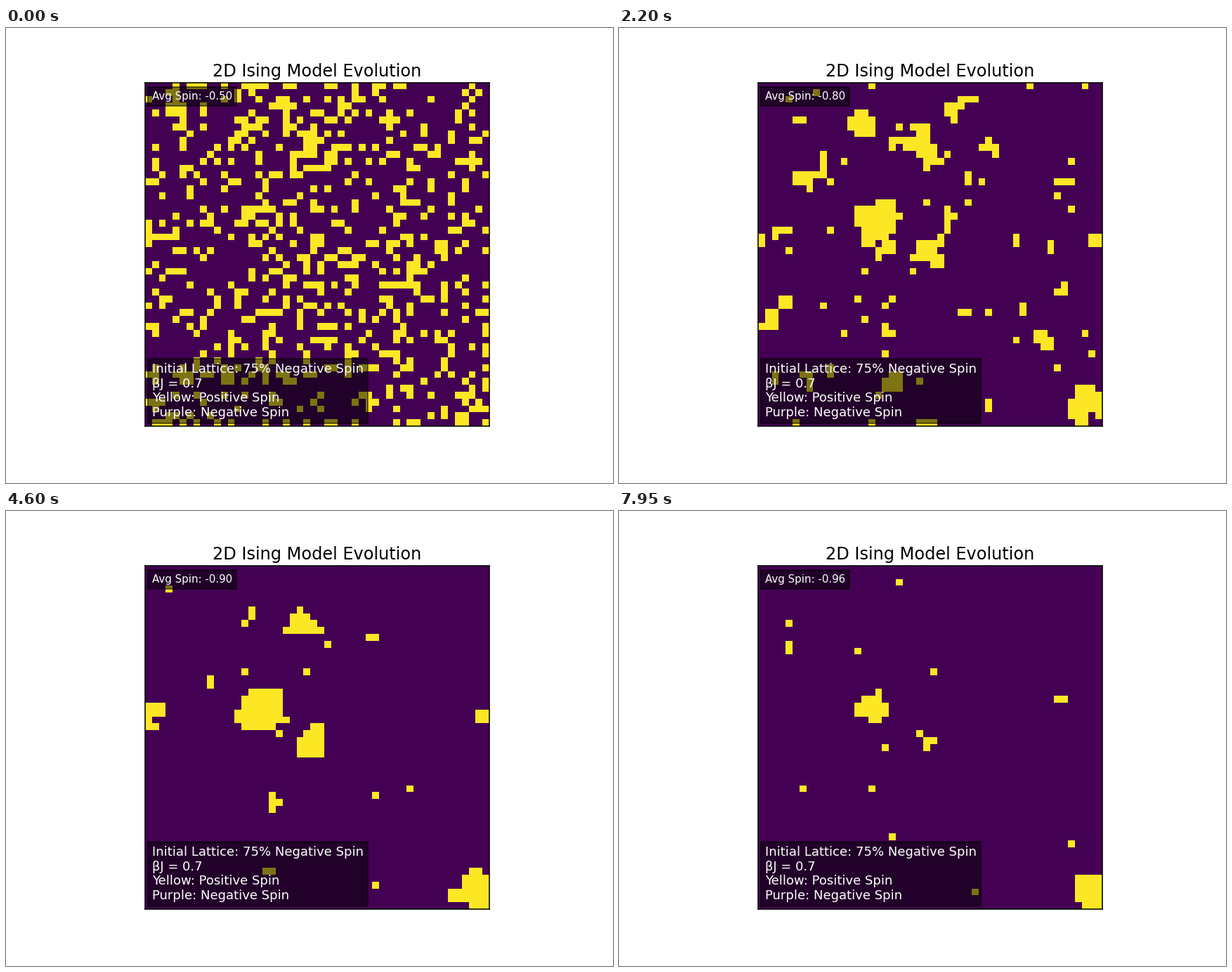
These frames come from a looping animation (864x648 px, 8000 ms). A matplotlib script:

```python
import numpy as np
import matplotlib.pyplot as plt
from matplotlib.animation import FuncAnimation
from matplotlib.colors import ListedColormap

W, H, DPI = 864, 648, 144
N, FRAMES, STEP = 50, 160, 50
BETA_J = 0.7
BAND = 3          # allowed deviation of the number of positive spins
MIN_TRIES, MAX_TRIES = 190, 900

# Key points of the average spin over time (s)
TIMES = [0, 1.2, 2.2, 3.1, 4.6, 5.55, 7.95]
SPINS = [-0.50, -0.73, -0.80, -0.85, -0.90, -0.93, -0.96]

# Main domains: centre row, centre column, lifetime (s)
DOMAINS = [
    (47.5, 48.5, 14), (21, 17, 10), (25, 25, 7.5), (8, 22.5, 7.5),
    (22, 0.5, 7), (35, 18.5, 4.5), (30, 45, 4.2), (5, 28.5, 4),
    (6, 15, 4), (44, 19, 4),
]

rng = np.random.default_rng(75)
ROWS, COLS = np.mgrid[0:N, 0:N] + 0.5


def domain_mask(t):
    """Discs whose area shrinks at one steady rate, as curved walls do."""
    mask = np.zeros((N, N), bool)
    for row, col, life in DOMAINS:
        mask |= (ROWS - row) ** 2 + (COLS - col) ** 2 < life - t
    return mask


def initial_lattice():
    rank = rng.random((N, N)) + 0.25 * domain_mask(0)
    spins = -np.ones((N, N), int)
    spins.flat[np.argsort(rank, axis=None)[-N * N // 4:]] = 1
    return spins


def positive_goal(t):
    """Number of positive spins, decaying exponentially between key points."""
    share = (np.array(SPINS) + 1) / 2
    return N * N * np.exp(np.interp(t, TIMES, np.log(share)))


def evolve(spins, t):
    """Metropolis flips that keep the average spin near its curve."""
    field = 2.0 * domain_mask(t)
    goal = positive_goal(t)
    up = int((spins == 1).sum())
    for k in range(MAX_TRIES):
        if k >= MIN_TRIES and up <= goal + BAND:
            break
        i, j = rng.integers(N, size=2)
        s = spins[i, j]
        if (s > 0 and up < goal - BAND) or (s < 0 and up > goal + BAND):
            continue
        near = (spins[i - 1, j] + spins[(i + 1) % N, j]
                + spins[i, j - 1] + spins[i, (j + 1) % N])
        cost = 2 * s * (near + field[i, j])
        if cost <= 0 or rng.random() < np.exp(-BETA_J * cost):
            spins[i, j] = -s
            up -= s


def simulate():
    spins = initial_lattice()
    history = [spins.copy()]
    for n in range(1, FRAMES):
        evolve(spins, n * STEP / 1000)
        history.append(spins.copy())
    return history


history = simulate()

fig = plt.figure(figsize=(W / DPI, H / DPI), dpi=DPI, facecolor="white")
side = 0.755 * H
ax = fig.add_axes([0.5127 - side / W / 2, 0.125, side / W, side / H])
ax.set_title("2D Ising Model Evolution", fontsize=12, pad=4.5)
image = ax.imshow(history[0], cmap=ListedColormap(["#440154", "#fde725"]),
                  vmin=-1, vmax=1, interpolation="nearest", aspect="auto")
ax.set_xticks([])
ax.set_yticks([])


def label(y, text, size, va):
    return ax.text(0.02, y, text, transform=ax.transAxes, color="white",
                   fontsize=size, va=va,
                   bbox=dict(facecolor="black", alpha=0.5, pad=3))


average = label(0.974, "", 7.5, "top")
label(0.02, "Initial Lattice: 75% Negative Spin\nβJ = 0.7\n"
      "Yellow: Positive Spin\nPurple: Negative Spin", 9, "bottom")


def draw(n):
    image.set_data(history[n])
    average.set_text(f"Avg Spin: {history[n].mean():.2f}")
    return image, average


anim = FuncAnimation(fig, draw, frames=FRAMES, interval=STEP,
                     repeat=True, repeat_delay=0)
plt.show()
```
